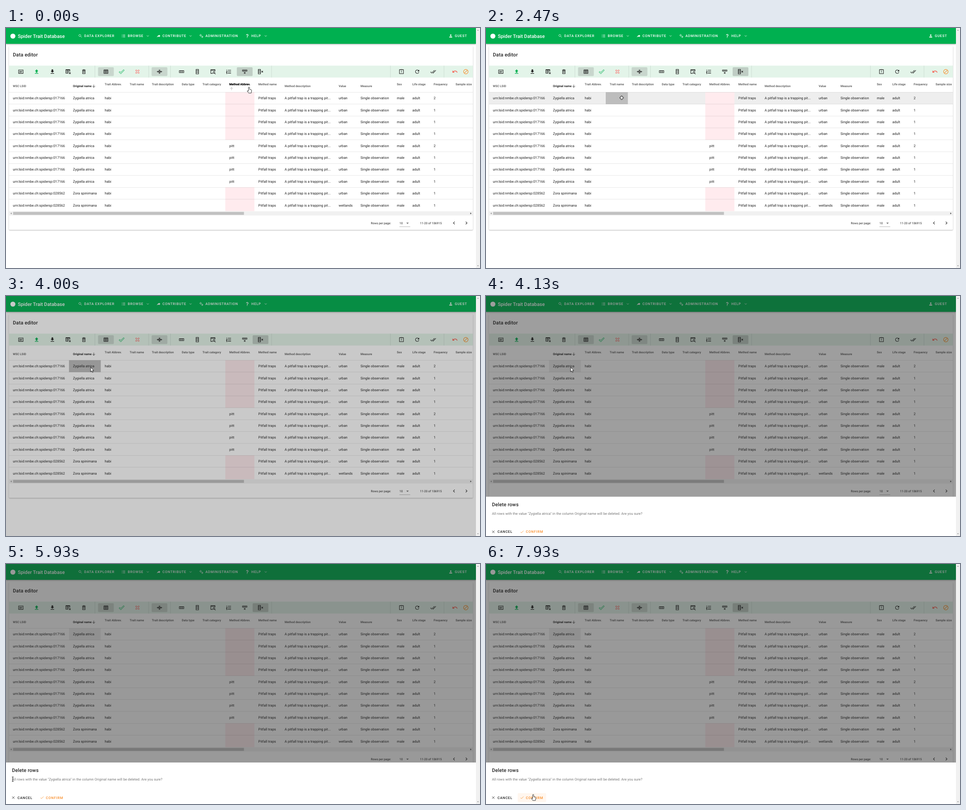
Recreate the animation shown at these times as an HTML page. Size 1053 by 532 pixels, loop 8 s.

```html
<!DOCTYPE html>
<html lang="en">
<head>
<meta charset="utf-8">
<title>Data editor</title>
<style>
  html, body { margin: 0; width: 100%; height: 100%; overflow: hidden; background: #fff; }
  svg { display: block; width: 1053px; height: 532px; font-family: Roboto, sans-serif; text-rendering: geometricPrecision; }
  text { white-space: pre; }
  .card { filter: drop-shadow(0 1px 1px rgba(0,0,0,.3)); }
  .bar { filter: drop-shadow(0 1.2px 1.6px rgba(0,0,0,.35)); }
  .button { font-weight: 500; letter-spacing: .0893em; }
  .title { font-weight: 500; letter-spacing: .0125em; }
  .head { font-weight: 700; }
</style>
</head>
<body>
<svg id="stage" viewBox="0 0 1053 532"></svg>
<script>
const INK = '#212121', GREEN = '#00b050', RED = '#ff5252', ORANGE = '#f98e2b';
const BODY = 7.69, SMALL = 6.59, LARGE = 10.98, ICON = 13.2;
const ROW_TOP = 142.4, ROW_H = 26.36;

// Icons on a 24-unit grid: outlines are stroked, solids are filled.
const outlines = {
  list: 'M9 6H21M9 12H21M9 18H21M3 6H6M3 12H6M3 18H6',
  cogs: 'M8 5a3.5 3.5 0 1 0 .1 0ZM8 2V5M8 12V15M2 8.5H5M11 8.5H14M17 14a2.7 2.7 0 1 0 .1 0ZM17 11.5V14M17 19V22M12 16.7H15M19 16.7H22',
  down: 'M6.7 9.3L12 14.6L17.3 9.3',
  left: 'M14.7 6.7L9.4 12L14.7 17.3',
  right: 'M9.3 6.7L14.6 12L9.3 17.3',
  card: 'M3 5H21V19H3ZM6 10H18M6 14H16',
  tableRemove: 'M13 18H3V4H19V12M3 6H19M3 12H17M11 6V18M16 15l6 6m0-6l-6 6',
  bin: 'M7 8H17V20H7ZM5 5H19M9 4H15M9.5 11.5l5 5m0-5l-5 5',
  table: 'M4 5H20V19H4ZM4 7H20M4 13H20M12 7V19',
  tickOutline: 'M19.8 3.6L22.6 6.4L8.3 20.7L1.4 13.8L4.2 11L8.3 15.1Z',
  crossOutline: 'M7.3 4.4L12 9.2L16.7 4.4L19.6 7.3L14.8 12L19.6 16.7L16.7 19.6L12 14.8L7.3 19.6L4.4 16.7L9.2 12L4.4 7.3Z',
  collapse: 'M10.5 4V20M13.5 4V20M1 12H7M23 12H17M5 9l3 3-3 3M19 9l-3 3 3 3',
  row: 'M3 8H21V16H3ZM9 8V16M15 8V16',
  column: 'M7 3H17V21H7ZM7 9H17M7 15H17',
  tableSearch: 'M11 19H3V4H20V10M3 7H20M15.5 11.5a3.5 3.5 0 1 0 .1 0ZM18 18l4 4',
  numbered: 'M8 6H21M8 12H21M8 18H21M3.5 4V8M2 11H5L2.5 14H5M2 16.5H4.5V20H2',
  rowRemove: 'M3 5H21V10H3ZM9 5V10M15 5V10M9 14l6 6m0-6l-6 6',
  columnRemove: 'M3 3H12V21H3ZM3 9H12M3 15H12M16 9l6 6m0-6l-6 6',
  clipboard: 'M4 4H20V20H4ZM9 3.5H15M12 8V13M12 15V17',
  checkAll: 'M1.1 12.7L6.7 18.3M6.8 12.7L11.7 17.6L23 6.3M17.3 6.3L11 12.6',
  cancel: 'M12 3a9 9 0 1 0 .1 0ZM5.6 18.4L18.4 5.6',
  cross: 'M5.7 5.7L18.3 18.3M18.3 5.7L5.7 18.3',
  tick: 'M4.2 12.8L9 17.6L20.3 6.3',
  sortDown: 'M12 4V18M4.8 11.2L12 18.4L19.2 11.2',
  sortUp: 'M12 20V6M4.8 12.8L12 5.6L19.2 12.8',
  search: 'M9.5 4a5.5 5.5 0 1 0 .1 0ZM13.8 13.8L20 20'
};
const solids = {
  share: 'M21 12L14 5V9C7 10 4 15 3 20C5.5 16.5 9 14.9 14 14.9V19Z',
  help: 'M10 19H13V22H10ZM12 2C17.35 2.22 19.68 7.62 16.5 11.67C15.67 12.67 14.33 13.33 13.67 14.17C13 15 13 16 13 17H10C10 15.33 10 13.92 10.67 12.92C11.33 11.92 12.67 11.33 13.5 10.67C15.92 8.43 15.32 5.26 12 5A3 3 0 0 0 9 8H6A6 6 0 0 1 12 2Z',
  account: 'M12 4a4 4 0 1 1-.1 0ZM12 14C16.4 14 20 15.8 20 18V20H4V18C4 15.8 7.6 14 12 14Z',
  upload: 'M9 16V10H5L12 3L19 10H15V16ZM5 20V18H19V20Z',
  download: 'M5 20H19V18H5ZM19 9H15V3H9V9H5L12 16Z',
  refresh: 'M17.65 6.35A8 8 0 1 0 19.73 14H17.65A6 6 0 1 1 16.22 7.78L13 11H20V4Z',
  undo: 'M12.5 8C9.85 8 7.45 9 5.6 10.6L2 7V16H11L7.4 12.4A8 8 0 0 1 20.1 16L22.5 15.2A10.5 10.5 0 0 0 12.5 8Z',
  menu: 'M7 10L12 15L17 10Z'
};
const cursors = {
  hand: 'M-1.4 7.8V1.2A1.2 1.2 0 0 1 1.1 1.2V5L4.6 5.8Q5.8 6.1 5.7 7.6L4.8 13.2H-.9L-4.2 8.9Q-4 7-1.4 9Z',
  arrow: 'M0 0V10L2.3 7.9L4 11.6L5.6 10.9L4 7.3H7Z',
  cell: 'M-1.4-4H1.4V-1.4H4V1.4H1.4V4H-1.4V1.4H-4V-1.4H-1.4Z',
  beam: 'M-2-5H2M0-5V5M-2 5H2'
};

const stage = document.getElementById('stage');
function add(tag, attrs, parent = stage) {
  const node = document.createElementNS('http://www.w3.org/2000/svg', tag);
  for (const key in attrs) node.setAttribute(key, attrs[key]);
  return parent.appendChild(node);
}
const rect = (x, y, width, height, fill, more, parent) =>
  add('rect', { x, y, width, height, fill, ...more }, parent);
function text(x, middle, content, size = BODY, fill = INK, cls = '', parent) {
  const node = add('text', { x, y: middle + size * .355, 'font-size': size, fill, class: cls }, parent);
  node.textContent = content;
  return node;
}
function icon(name, x, y, size = ICON, color = INK, parent) {
  const k = size / 24, line = outlines[name];
  const thin = name.endsWith('Outline');
  return add('path', {
    d: line || solids[name],
    transform: `translate(${x - size / 2} ${y - size / 2}) scale(${k})`,
    fill: line ? 'none' : color, stroke: line ? color : 'none', 'stroke-width': thin ? 1.8 : 2
  }, parent);
}

// Page and card
rect(0, 0, 1053, 532, '#fff');
rect(6.6, 40, 1030.6, 407.5, '#fff', { rx: 2, class: 'card' });
text(15.3, 59.5, 'Data editor', LARGE, INK, 'title');

// App bar
rect(0, 0, 1044, 35.1, GREEN, { class: 'bar' });
add('circle', { cx: 15.3, cy: 18, r: 5.6, fill: '#fff' });
text(26.2, 17.8, 'Spider Trait Database', 10.85, '#fff').setAttribute('font-weight', 500);
[['search', 165, 173.8, 'DATA EXPLORER'], ['list', 261, 270.5, 'BROWSE', 315],
 ['share', 339, 347.5, 'CONTRIBUTE', 410], ['cogs', 434, 443, 'ADMINISTRATION'],
 ['help', 536, 545, 'HELP', 577], ['account', 988, 997, 'GUEST']
].forEach(([name, x, labelX, label, chevron]) => {
  icon(name, x, 17.6, 9.9, '#fff');
  text(labelX, 17.7, label, BODY, '#fff', 'button');
  if (chevron) icon('down', chevron, 17.6, 9.9, '#fff');
});

// Toolbar
const TOOL_Y = 96.8;
rect(6.6, 83.4, 1030.6, 26.4, '#e3f4e9');
for (const x of [197.5, 317, 365.6, 590, 854, 973]) rect(x - .3, 83.4, .6, 26.4, 'rgba(0,0,0,.16)');
const shade = (x, opacity) => rect(x - 17.5, 87, 35, 19.6, '#000', { rx: 2, opacity });
shade(222, .12);
shade(341, .12);
const rowToolShade = shade(530.3, .16), columnToolShade = shade(565.4, 0);
[['card', 33], ['upload', 68, GREEN], ['download', 103], ['tableRemove', 138], ['bin', 173], ['table', 222],
 ['tickOutline', 257, GREEN], ['crossOutline', 292, RED], ['collapse', 341], ['row', 390], ['column', 425],
 ['tableSearch', 460], ['numbered', 495], ['rowRemove', 530.3], ['columnRemove', 565.4], ['clipboard', 878.5],
 ['refresh', 913.5], ['checkAll', 949], ['undo', 997.3, '#f4695c'], ['cancel', 1021.5, ORANGE]
].forEach(([name, x, color]) => icon(name, x, TOOL_Y, ICON, color));

// Table
const rowHover = rect(6.6, ROW_TOP, 1030.6, ROW_H, '#eee');
rect(487.2, ROW_TOP, 64.6, 4 * ROW_H, '#ffebee');
rect(487.2, ROW_TOP + 8 * ROW_H, 64.6, 2 * ROW_H, '#ffebee');
const cellHover = rect(0, ROW_TOP, 0, ROW_H, '#bdbdbd');
for (let i = 0; i < 10; i++) rect(6.6, ROW_TOP - .3 + i * ROW_H, 1030.6, .6, 'rgba(0,0,0,.16)');

const columns = [
  [15.3, 'WSC LSID', 129], [148.7, 'Original name', 129], [219.3, 'Trait Abbrev.'], [274.8, 'Trait name'],
  [324, 'Trait description'], [390.5, 'Data type'], [436.5, 'Trait category'], [496, 'Method Abbrev.'],
  [560.6, 'Method name'], [619, 'Method description', 129], [739, 'Value', 129], [787.5, 'Measure', 129],
  [868.3, 'Sex'], [902.8, 'Life stage'], [950, 'Frequency'], [998.8, 'Sample size']
];
for (const [x, label, y = 124.2] of columns)
  text(x, y, label, SMALL, label === 'Original name' ? INK : '#666', 'head');
icon('sortDown', 195, 129, 9.9);
const headHover = add('g', {});
text(496, 124.2, 'Method Abbrev.', SMALL, '#000', 'head', headHover);
icon('sortUp', 501, 134.5, 9.9, '#aaa', headHover);

for (let i = 0; i < 10; i++) {
  const zora = i > 7;
  const cells = [
    'urn:lsid:nmbe.ch:spidersp:' + (zora ? '028562' : '017166'), zora ? 'Zora spinimana' : 'Zygiella atrica',
    'habi', '', '', '', '', i > 3 && !zora ? 'pitt' : '', 'Pitfall traps', 'A pitfall trap is a trapping pit...',
    i === 9 ? 'wetlands' : 'urban', 'Single observation', 'male', 'adult', i % 4 || zora ? '1' : '2'
  ];
  cells.forEach((value, c) => value && text(columns[c][0], ROW_TOP + (i + .5) * ROW_H, value));
}

// Scrollbars and footer
rect(6.6, 406.3, 1030.6, 9.3, '#f1f1f1');
rect(15.8, 407.6, 512.8, 6.6, '#c1c1c1');
add('path', { d: 'M12.5 409L10 411L12.5 413Z', fill: '#8a8a8a' });
add('path', { d: 'M1031.5 409L1034 411L1031.5 413Z', fill: '#404040' });
text(810.5, 432.2, 'Rows per page:', SMALL);
text(874, 432.2, '10', SMALL);
icon('menu', 892, 432.5, ICON, '#666');
rect(874, 440.2, 24, .6, '#8a8a8a');
text(919.8, 432.2, '11-20 of 106915', SMALL);
icon('left', 995.3, 432.2);
icon('right', 1022.8, 432.2);
rect(1044, 0, 9, 532, '#f1f1f1');
add('path', { d: 'M1046.5 6L1048.5 3.6L1050.5 6Z', fill: '#a3a3a3' });
add('path', { d: 'M1046.5 526L1048.5 528.4L1050.5 526Z', fill: '#a3a3a3' });

// Tooltip
const tooltip = add('g', {});
rect(487.8, 63.8, 155.4, 17.2, '#616161', { rx: 2.2, opacity: .9 }, tooltip);
text(496.4, 72.3, 'Delete all rows containing selected value', BODY, '#fff', '', tooltip);

// Overlay and bottom sheet
const overlay = rect(0, 0, 1044, 532, '#212121');
const sheet = add('g', {});
rect(0, 440, 1044, 100, '#fff', {}, sheet);
text(13.2, 457.6, 'Delete rows', LARGE, INK, 'title', sheet);
text(13.2, 477.2, 'All rows with the value "Zygiella atrica" in the column Original name will be deleted. Are you sure?',
  BODY, '#757575', '', sheet).setAttribute('letter-spacing', '.0071em');
const confirmHover = rect(70.5, 508, 63, 19.8, ORANGE, { rx: 2, opacity: .08 }, sheet);
icon('cross', 16.3, 517.8, 9.9, INK, sheet);
text(25.5, 517.8, 'CANCEL', BODY, INK, 'button', sheet);
icon('tick', 80, 517.8, 9.9, ORANGE, sheet);
text(88.6, 517.8, 'CONFIRM', BODY, ORANGE, 'button', sheet);

const pointer = add('path', { fill: '#fff', stroke: '#000', 'stroke-width': .8, 'stroke-linejoin': 'round' });

// Pointer track: time, x, y, shape used until the next stop
const track = [
  [0, 540, 131, 'hand'], [470, 563, 100, 'hand'], [733, 565, 99, 'hand'], [933, 565, 99, 'hand'],
  [1000, 566, 98, 'hand'], [1933, 566, 98, 'arrow'], [2200, 440, 148, 'cell'], [2600, 232, 158, 'cell'],
  [2667, 206, 158, 'cell'], [2733, 198, 159, 'cell'], [2800, 198, 159, 'cell'], [3133, 188, 158.5, 'cell'],
  [4000, 188, 158, 'arrow'], [4333, 188, 158, 'arrow'], [4800, 108, 504, 'arrow'], [5333, 10, 481, 'arrow'],
  [5400, 10, 481, 'arrow'], [5667, 15, 478, 'beam'], [5933, 15, 477, 'beam'], [6000, 15, 477, 'beam'],
  [6733, 345, 478, 'arrow'], [6867, 370, 486, 'arrow'], [7067, 370, 486, 'arrow'], [7200, 335, 478, 'beam'],
  [7533, 16, 477, 'beam'], [7600, 30, 487, 'arrow'], [7800, 100, 508, 'hand'], [7933, 105, 511, 'hand']
];
const ramp = (t, from, to) => Math.min(1, Math.max(0, (t - from) / (to - from)));
function pointerAt(t) {
  const next = track.findIndex(stop => stop[0] > t);
  const a = track[(next < 0 ? track.length : next) - 1], b = next < 0 ? a : track[next];
  const p = a === b ? 0 : ramp(t, a[0], b[0]);
  return [a[1] + (b[1] - a[1]) * p, a[2] + (b[2] - a[2]) * p, a[3]];
}
const fade = (node, opacity) => node.setAttribute('opacity', opacity);

function draw(t) {
  const [x, y, shape] = pointerAt(t);
  pointer.setAttribute('d', cursors[shape]);
  pointer.setAttribute('transform', `translate(${x} ${y})`);

  fade(headHover, 1 - ramp(t, 200, 470));
  fade(tooltip, ramp(t, 470, 700) - ramp(t, 1900, 2070));
  const clicked = t > 1850;
  fade(rowToolShade, clicked ? 0 : .16);
  fade(columnToolShade, clicked ? .16 : t > 400 ? .04 : 0);

  const inRow = shape === 'cell' && y > ROW_TOP, asked = t >= 4000;
  fade(rowHover, inRow ? 1 : 0);
  fade(cellHover, inRow || asked ? 1 : 0);
  const c = asked ? 1 : columns.findLastIndex(col => col[0] - 8.8 <= x);
  cellHover.setAttribute('x', columns[c][0] - 8.8);
  cellHover.setAttribute('width', columns[c + 1][0] - columns[c][0]);
  const grey = 189 + 49 * ramp(t, 4000, 4130);
  cellHover.setAttribute('fill', `rgb(${grey},${grey},${grey})`);

  fade(overlay, asked ? .24 + .22 * ramp(t, 4000, 4150) : 0);
  const drop = 92 * (1 - ramp(t, 4000, 4300)) ** 5;
  sheet.setAttribute('transform', `translate(0 ${drop})`);
  fade(confirmHover, t > 7790 ? .08 : 0);
}

const start = performance.now();
function tick() {
  const t = (performance.now() - start) % 8000;
  draw(Math.floor(t * .015 + .06) / .015);
  requestAnimationFrame(tick);
}
tick();
</script>
</body>
</html>
```
